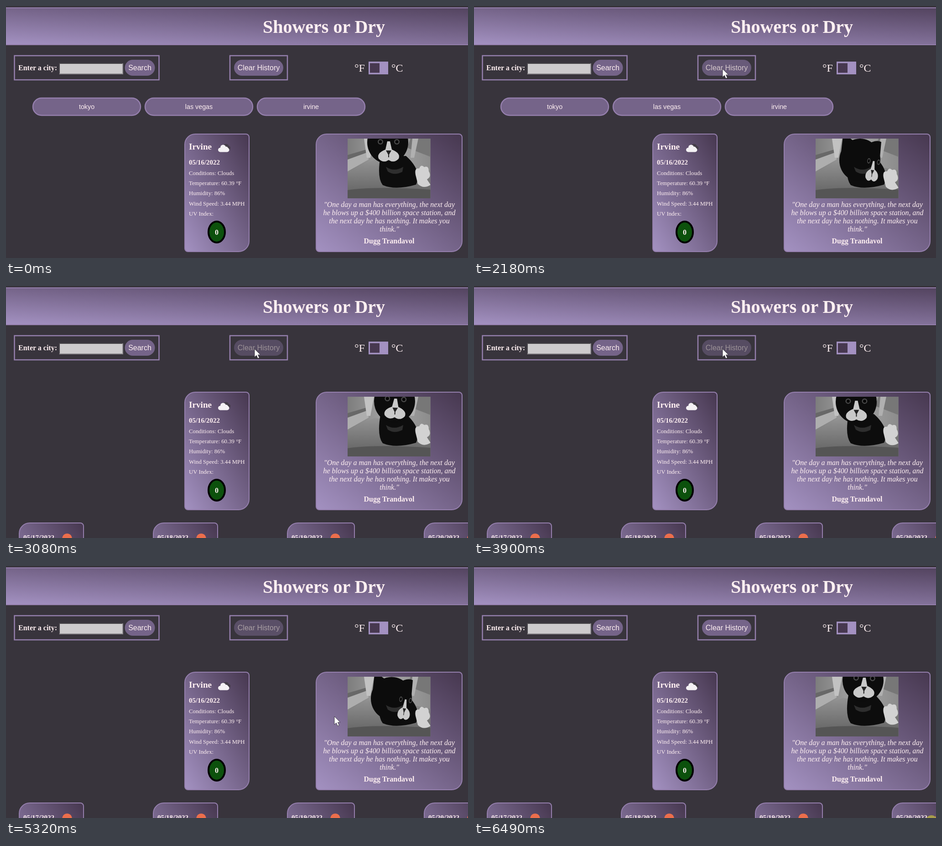
Write an HTML page that moves like this. It is 1013 px wide and 553 px high and loops after 6.56 s.

```html
<!DOCTYPE html>
<html lang="en">
<head>
<meta charset="utf-8">
<title>Showers or Dry</title>
<style>
  html, body { margin: 0; width: 100%; height: 100%; overflow: hidden; background: #38343c; }
  body { position: relative; }
  #low, svg.layer { position: absolute; left: 0; top: 0; width: 1013px; height: 620px; }
  .panel {
    position: absolute; box-sizing: border-box; border: 2px solid #957fad;
    background: linear-gradient(to top right, #a391c1, #756489, #473850);
  }
  .card { border-radius: 24px 8px; }
  header { left: -2px; top: 3px; width: 1398px; height: 83px; }
  text { font: 12.8px "Liberation Serif", "Times New Roman", serif; fill: #fff0f2; white-space: pre; }
  .b { font-weight: bold; font-size: 16px; }
  .i { font-style: italic; font-size: 16px; }
  .mid { text-anchor: middle; }
  .ui { font: 16px "Liberation Sans", Arial, sans-serif; text-anchor: middle; }
  .frame { fill: none; stroke: #957fad; stroke-width: 2.5; }
  .btn { fill: #756489; }
  .past { fill: #756489; stroke: #957fad; stroke-width: 2.5; }
</style>
</head>
<body>
<header class="panel"></header>

<svg class="layer">
  <text class="b mid" x="697" y="59" style="font-size:40px">Showers or Dry</text>

  <rect class="frame" x="18.5" y="109" width="317" height="53"/>
  <text class="b" x="27" y="140.5">Enter a city:</text>
  <rect x="116" y="125" width="141" height="25" fill="#cdcbcd"/>
  <path d="M117 150V126H257" fill="none" stroke="#4a474c" stroke-width="2"/>
  <path d="M117 149H256V126" fill="none" stroke="#8d8a8f" stroke-width="2"/>
  <rect class="btn" x="260.5" y="118" width="66" height="35" rx="17.5"/>
  <text class="ui" x="293.5" y="141">Search</text>

  <rect class="frame" x="491" y="109" width="126" height="53"/>
  <g id="clear">
    <rect class="btn" x="500" y="118" width="108" height="35" rx="17.5"/>
    <text class="ui" x="554" y="141">Clear History</text>
  </g>

  <text x="764" y="144" style="font-size:24px">°F</text>
  <rect x="795" y="122" width="43" height="28" fill="#a391c1"/>
  <rect x="798" y="125.5" width="21" height="21" fill="#473850"/>
  <text x="845" y="144" style="font-size:24px">°C</text>
  <g id="history"></g>
</svg>

<div id="low">
  <div class="panel card" style="left:391px;top:280px;width:143px;height:260px"></div>
  <div class="panel card" style="left:679px;top:280px;width:322px;height:260px"></div>
  <svg class="layer">
    <text class="b" x="401" y="315" style="font-size:19.2px">Irvine</text>
    <g fill="#453e49"><circle cx="482.5" cy="308.5" r="6"/><circle cx="488" cy="311.5" r="4.3"/></g>
    <g fill="#f4f1f4">
      <rect x="465" y="311" width="24.5" height="9.5" rx="4.7"/>
      <circle cx="476" cy="310.5" r="6"/><circle cx="482.5" cy="313" r="4.5"/>
    </g>
    <text class="b" x="401" y="348" style="font-size:14.9px">05/16/2022</text>
    <g id="facts"></g>
    <ellipse cx="462" cy="496" rx="18" ry="23" fill="#0c510c" stroke="#000" stroke-width="4"/>
    <text class="b mid" x="462" y="501.5">0</text>
    <g id="quote"></g>
    <text class="b mid" x="840" y="521">Dugg Trandavol</text>

    <svg x="749" y="291" width="181.5" height="131">
      <defs>
        <linearGradient id="wall"><stop stop-color="#7d7d7d"/><stop offset=".5" stop-color="#a6a6a6"/><stop offset="1" stop-color="#8c8c8c"/></linearGradient>
        <linearGradient id="floor" x2="0" y2="1"><stop stop-color="#939393"/><stop offset="1" stop-color="#5f5f5f"/></linearGradient>
      </defs>
      <rect width="182" height="131" fill="url(#wall)"/>
      <path d="M0 72L60 46L182 70V131H0Z" fill="url(#floor)"/>
      <path d="M0 44L46 28V46L0 72Z" fill="#aeaeae"/>
      <path d="M0 36L44 23V30L0 46Z" fill="#686868"/>
      <path d="M36 0H58L50 42H42Z" fill="#c2c2c2"/>
      <path d="M138 0H182V40L130 20Z" fill="#777"/>
      <path d="M142 0H155L146 42H138Z" fill="#b0b0b0"/>
      <path d="M0 113Q60 104 182 112V131H0Z" fill="#555"/>
      <g style="filter:blur(.7px)">
        <path d="M72 40Q64 85 77 102Q105 114 150 101Q164 70 128 38Z" fill="#0d0d0d"/>
        <g id="head" fill="#0c0c0c">
          <ellipse rx="45" ry="47"/>
          <path d="M-43 -8L-44 -50Q-25 -45 -12 -34Z M12 -36Q27 -50 41 -46L43 -8Z"/>
        </g>
        <path d="M84 62Q102 74 122 62L120 73Q102 82 88 72Z" fill="#2e2e2e"/>
        <g id="face">
          <path d="M-3 -26H3L7 -8Q27 0 22 12Q12 23 0 15Q-12 23 -22 12Q-27 0 -7 -8Z" fill="#c9c9c9"/>
          <path d="M-6 -6H6L1 3V9H-1V3Z" fill="#222"/>
          <g fill="#484848"><circle cx="-18" cy="-25" r="6"/><circle cx="18" cy="-25" r="6"/></g>
          <g fill="#050505"><circle cx="-18" cy="-25" r="3.5"/><circle cx="18" cy="-25" r="3.5"/></g>
        </g>
        <path id="paw" d="M149 80Q146 64 157 66Q161 56 168 63Q178 59 178 72Q185 84 174 90L182 102Q166 112 154 100Z" fill="#d2d2d2"/>
      </g>
    </svg>
    <g id="suns" fill="#ec6e4c"></g>
  </svg>
</div>

<svg class="layer">
  <circle id="halo" cx="1003" cy="560" r="13" fill="#a89d4c"/>
  <path id="cursor" d="M0 0V18L4.2 14.2L7.2 21L10.4 19.6L7.4 13H12.8Z" fill="#fff" stroke="#2b2830" stroke-width=".8"/>
</svg>

<script>
const LOOP = 6560, CLEARED = 2950;
const $ = id => document.getElementById(id);
const label = (cls, x, y, s) => `<text class="${cls}" x="${x}" y="${y}">${s}</text>`;

$('history').innerHTML = ['tokyo', 'las vegas', 'irvine'].map((city, i) =>
  `<rect class="past" x="${59 + 246 * i}" y="202" width="236" height="38" rx="19"/>` +
  `<text class="ui" x="${177 + 246 * i}" y="225.5" style="font-size:14.3px">${city}</text>`).join('');

$('facts').innerHTML = ['Conditions: Clouds', 'Temperature: 60.39 °F', 'Humidity: 86%', 'Wind Speed: 3.44 MPH', 'UV Index:']
  .map((s, i) => label('', 401, 371 + 22.2 * i, s)).join('');

$('quote').innerHTML = ['"One day a man has everything, the next day', 'he blows up a $400 billion space station, and',
  'the next day he has nothing. It makes you', 'think."']
  .map((s, i) => label('i mid', 840.5, 440.5 + 18.2 * i, s)).join('');

// Forecast cards: left edge, width
[[28, 143], [322, 143], [616, 149], [916, 143]].forEach(([x, w], i) => {
  const card = document.createElement('div');
  card.className = 'panel card';
  card.style.cssText = `left:${x}px;top:567px;width:${w}px;height:260px`;
  $('low').prepend(card);
  $('suns').innerHTML += `<circle cx="${x + 106}" cy="602" r="10.8"/>` +
    `<text class="b" x="${x + 10}" y="605" style="font-size:14.9px">05/${17 + i}/2022</text>`;
});

// time, head x, head y, tilt, face x, face y, face width
const catKeys = [
  [0, 88, 8, 0, 90, 32, 1],
  [1200, 90, 14, 0, 89, 37, 1],
  [1500, 88, 51, 8, 123, 80, .5],
  [2180, 97, 47, 8, 124, 75, .6],
  [2530, 110, 21, 8, 113, 51, 1],
  [3080, 103, 10, 3, 104, 30, 1],
  [3210, 104, 8, 2, 106, 28, 1],
  [3280, 88, 8, 0, 90, 32, 1]
];
// time, x, y
const cursorKeys = [
  [1340, 979, 211], [1480, 924, 207], [1700, 850, 190], [1950, 606, 150], [2110, 545, 138],
  [3900, 545, 138], [4100, 547, 139], [5180, 547, 139], [5250, 585, 170], [5320, 720, 330]
];

const clamp = v => Math.min(1, Math.max(0, v));
const smooth = v => v * v * (3 - 2 * v);
const easeOut = v => 1 - (1 - clamp(v)) ** 2;

function sample(keys, t, ease = v => v) {
  const n = keys.findIndex(k => k[0] > t);
  if (n < 0) return keys.at(-1).slice(1);
  if (n === 0) return keys[0].slice(1);
  const a = keys[n - 1], b = keys[n], p = ease((t - a[0]) / (b[0] - a[0]));
  return a.slice(1).map((v, i) => v + (b[i + 1] - v) * p);
}

const show = (id, on) => $(id).setAttribute('visibility', on ? 'visible' : 'hidden');
const move = (id, x, y, rest = '') => $(id).setAttribute('transform', `translate(${x} ${y}) ${rest}`);

function draw(now) {
  const t = now % LOOP;
  const cleared = t >= CLEARED;
  show('history', !cleared);
  $('low').style.top = cleared ? '-48px' : '0';

  const [hx, hy, tilt, fx, fy, fw] = sample(catKeys, t % (LOOP / 2), smooth);
  move('head', hx, hy, `rotate(${tilt})`);
  move('face', fx, fy, `rotate(${tilt}) scale(${fw} 1)`);
  move('paw', 0, (fy - 36) * .15);

  // Hover dims the button slowly, leaving restores it
  $('clear').style.opacity = 1 - .5 * easeOut((t - 1950) / 1000) + .5 * easeOut((t - 5250) / 1000);
  move('cursor', ...sample(cursorKeys, t));
  show('cursor', t >= 1335 && t < 5390);
  show('halo', t >= 6485);
  requestAnimationFrame(draw);
}
requestAnimationFrame(draw);
</script>
</body>
</html>
```
